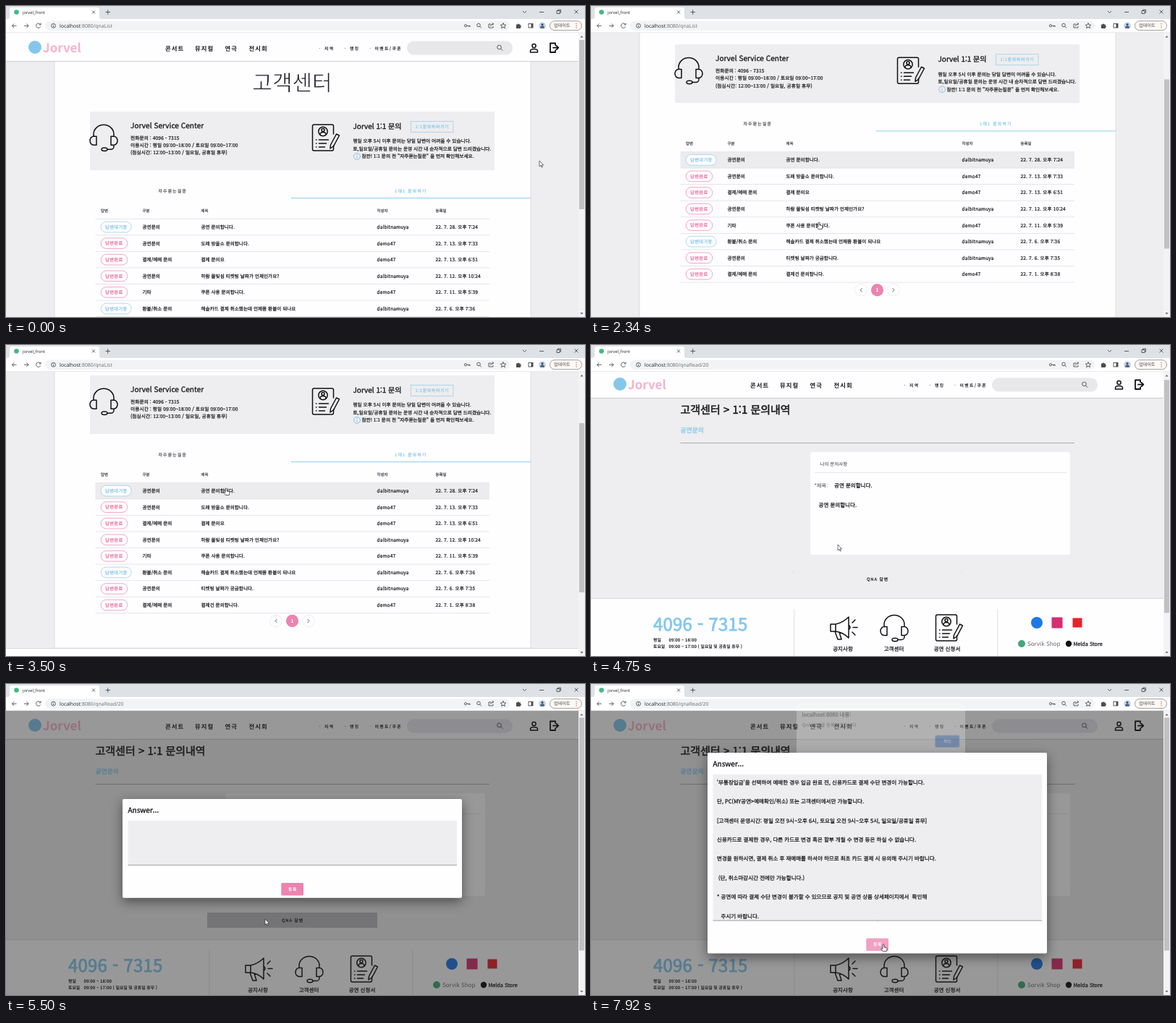
Recreate the animation shown at these times as an HTML page. Size 800 by 430 pixels, loop 8 s.

```html
<!DOCTYPE html>
<html lang="ko">
<head>
<meta charset="utf-8">
<title>jorvel_front</title>
<style>
html, body { margin: 0; width: 100%; height: 100%; overflow: hidden; background: #fff; }
svg { display: block; width: 800px; height: 430px; text-rendering: geometricPrecision; font-family: "Noto Sans CJK KR", "Noto Sans KR", "Noto Sans CJK JP", "Noto Sans CJK", sans-serif; }
.ui { font-family: "Open Sans", "Noto Sans CJK KR", "Noto Sans CJK JP", sans-serif; }
.line { fill: none; stroke: #111; stroke-width: 1.5; stroke-linecap: round; stroke-linejoin: round; }
.tool { fill: none; stroke: #4a4d51; stroke-width: .9; }
.raised { filter: drop-shadow(0 .9px .4px #0005); }
.modal { filter: drop-shadow(0 5px 8px #0007); }
</style>
</head>
<body>
<script>
const BLUE = '#84c7ea', PINK = '#ee82b1', GREY = '#eeedef', WHITE = '#fefdff', INK = '#1c1c1e';
const ROW_TOP = 294.3, ROW_H = 22.57;

// Light and medium weights are made from the regular face with a thin outline.
const outline = (weight, size, fill) =>
  weight === 300 ? `stroke="${WHITE}" stroke-width="${size * .025}"`
  : weight === 500 ? `stroke="${fill}" stroke-width="${size * .035}"` : '';

// Text placed by its vertical centre.
const text = (x, y, str, { size = 6.67, fill = INK, weight = 500, gap = 0, mid = false, cls = '' } = {}) =>
  `<text x="${x}" y="${y + size * .37}" font-size="${size}" fill="${fill}" font-weight="${weight === 700 ? 700 : 400}"
    letter-spacing="${gap}" ${outline(weight, size, fill)} ${mid ? 'text-anchor="middle"' : ''} class="${cls}">${str.replace(/>/g, '&gt;')}</text>`;
const rect = (x, y, w, h, fill, more = '') => `<rect x="${x}" y="${y}" width="${w}" height="${h}" fill="${fill}" ${more}/>`;
const circle = (x, y, r, fill, more = '') => `<circle cx="${x}" cy="${y}" r="${r}" fill="${fill}" ${more}/>`;
const path = (d, cls = 'line', more = '') => `<path d="${d}" class="${cls}" ${more}/>`;
const at = (x, y, body) => `<g transform="translate(${x} ${y})">${body}</g>`;

const headset = path('M5 17v-3a14 13 0 0 1 28 0v3M33 29v2a4 4 0 0 1-4 4h-5M9 17v12H5a5 6 0 0 1 0-12zM29 17v12h4a5 6 0 0 0 0-12z')
  + '<ellipse cx="20" cy="35" rx="4" ry="2.2" class="line"/>';
const form = path('M30 14V3a2 2 0 0 0-2-2H3a2 2 0 0 0-2 2v32a2 2 0 0 0 2 2h25a2 2 0 0 0 2-2v-5')
  + circle(15.5, 10.5, 6.2, 'none', 'class="line"') + circle(15.5, 8.5, 2, 'none', 'class="line"')
  + path('M11.5 14.5q0-3 4-3t4 3M6 22h.5M10 22h13M6 27h.5M10 27h10M6 32h.5M10 32h8M34 14l4 2-8 15-4.5 3 .5-5z');
const megaphone = path('M1 11h7v10H1zM8 11Q18 9 26 1v29Q18 22 8 21M7 21l4 11h5l-3-10M26 12q4 3 0 7M31 9l4-4M32 15.5h6M31 22l4 4');
const magnifier = (x, y, r) => circle(x, y, r, 'none', 'class="tool"') + path(`M${x + r * .7} ${y + r * .7}l${r} ${r}`, 'tool');

const siteHeader = rect(0, 37, 791, 39, WHITE) + rect(0, 76, 791, .8, '#c9c8ca')
  + circle(40, 57, 9, BLUE) + text(51, 58, 'Jorvel', { size: 17, fill: '#f6b3cb', weight: 700 })
  + [[220, '콘서트'], [261, '뮤지컬'], [302.5, '연극'], [335.5, '전시회']].map(([x, s]) =>
      text(x, 58.5, s, { size: 8.33, weight: 700, gap: 1.05 })).join('')
  + [[440, '지역'], [475, '랭킹'], [509.5, '이벤트/쿠폰']].map(([x, s]) =>
      text(x, 58.5, s, { size: 5.83, weight: 700, gap: 1.4 }) + circle(x - 6.5, 58.5, .6, '#777')).join('')
  + rect(554, 48.5, 146, 19, '#e8e7e9', 'rx="9.5"') + magnifier(681.5, 57, 2.8)
  + circle(729.5, 55, 2.6, 'none', 'class="line"') + path('M724.5 64v-1.5q0-3 5-3t5 3V64z')
  + path('M759 54v-2.5h-7v12.5h7V61.5M756 57.7h7M760.5 55l2.8 2.7-2.8 2.7', 'line', 'style="stroke-width:1.8"');

const rows = [
  [0, '공연문의', '공연 문의합니다.', 0, '22. 7. 28. 오후 7:24'],
  [1, '공연문의', '도래 방울쇼 문의합니다.', 1, '22. 7. 13. 오후 7:33'],
  [1, '결제/예매 문의', '결제 문의요', 1, '22. 7. 13. 오후 6:51'],
  [1, '공연문의', '하람 물빛섬 티켓팅 날짜가 언제인가요?', 0, '22. 7. 12. 오후 10:24'],
  [1, '기타', '쿠폰 사용 문의합니다.', 1, '22. 7. 11. 오후 5:39'],
  [0, '환불/취소 문의', '해솔카드 결제 취소했는데 언제쯤 환불이 되나요', 0, '22. 7. 6. 오후 7:36'],
  [1, '공연문의', '티켓팅 날짜가 궁금합니다.', 0, '22. 7. 6. 오후 7:35'],
  [1, '결제/예매 문의', '결제건 문의합니다.', 1, '22. 7. 1. 오후 8:38'],
];
const users = ['dalbitnamuya', 'demo47'];
const rowMarkup = ([done, kind, title, user, date], i) => {
  const y = ROW_TOP + ROW_H * (i + .5), color = done ? '#ec6b9b' : '#7fc3ea', cell = { size: 6.55, gap: .05 };
  return rect(131.2, y - 7.3, done ? 36.6 : 42, 14.6, WHITE, `rx="7.3" stroke="${color}" stroke-width=".6"`)
    + text(137, y, done ? '답변완료' : '답변대기중', { size: 6.2, fill: color, gap: .45 })
    + text(188.5, y, kind, cell) + text(269.5, y, title, cell)
    + text(512.5, y, users[user], { ...cell, gap: .12 }) + text(593.5, y, date, { ...cell, gap: .15 })
    + rect(123.5, y + ROW_H / 2 - .4, 544.5, .7, '#dcdbdd');
};
const pager = (x, d) => circle(x, 485.5, 8.3, WHITE, 'class="raised"') + path(d, 'tool');

const listPage = rect(0, 37, 791, 500, GREY) + rect(67, 76, 658, 447, WHITE, 'stroke="#d3d2d4" stroke-width=".7"')
  + rect(0, 523, 791, 20, WHITE) + rect(0, 523, 791, .7, '#c9c8ca') + siteHeader
  + text(395.5, 105.5, '고객센터', { size: 30, weight: 300, mid: true })
  + rect(116, 146, 559, 81, GREY) + at(116, 163.3, headset) + at(422.5, 163, form)
  + text(172, 165.5, 'Jorvel Service Center', { size: 10, gap: .07 })
  + text(172, 182.5, '전화문의 : 4096 - 7315', { gap: .1 })
  + text(172, 192.5, '이용시간 : 평일 09:00~18:00 / 토요일 09:00~17:00', { gap: .1 })
  + text(172, 203, '(점심시간: 12:00~13:00 / 일요일, 공휴일 휴무)', { gap: .1 })
  + text(479.5, 166, 'Jorvel 1:1 문의', { size: 10 })
  + rect(559.5, 159.5, 58.5, 15, 'none', `stroke="${BLUE}" stroke-width=".6"`)
  + text(565.5, 167, '1:1문의하러가기', { size: 5.83, fill: BLUE, gap: .7 })
  + text(479.5, 187, '평일 오후 5시 이후 문의는 당일 답변이 어려울 수 있습니다.')
  + text(479.5, 197.5, '토,일요일/공휴일 문의는 운영 시간 내 순차적으로 답변 드리겠습니다.')
  + circle(485, 208, 4.4, 'none', `stroke="${BLUE}"`) + rect(484.5, 207.5, 1, 3, BLUE) + rect(484.5, 205.5, 1, 1, BLUE)
  + text(491.5, 208, '잠깐! 1:1 문의 전 "자주묻는질문" 을 먼저 확인해보세요.')
  + text(210.5, 255.5, '자주묻는질문', { size: 5.83, fill: '#555', gap: 1.25 })
  + text(537, 255.5, '1대1 문의하기', { size: 5.83, fill: BLUE, gap: 1.2 })
  + rect(394, 265.2, 331, .9, BLUE)
  + [[131, '답변'], [188.5, '구분'], [269.5, '제목'], [512.5, '작성자'], [593.5, '등록일']]
      .map(([x, s]) => text(x, 283, s, { size: 5.4, fill: '#444' })).join('')
  + rect(123.5, ROW_TOP - .4, 544.5, .7, '#dcdbdd')
  + rect(123.5, ROW_TOP, 544.5, ROW_H, '#ecebed', 'id="hover"') + rows.map(rowMarkup).join('')
  + pager(373, 'M374.5 483l-2.5 2.5 2.5 2.5') + pager(418, 'M416.5 483l2.5 2.5-2.5 2.5')
  + circle(395.5, 485.5, 8.4, PINK, 'class="raised"') + text(395.5, 485.5, '1', { fill: '#fff', weight: 700, mid: true });

const foot = { size: 5.9, weight: 700 }, label = { size: 7.5, mid: true };
const readPage = rect(0, 37, 791, 400, GREY) + siteHeader
  + text(123.5, 92.6, '고객센터 > 1:1 문의내역', { size: 15 })
  + text(123.5, 121, '공연문의', { size: 8.8, fill: BLUE }) + rect(123.5, 138.2, 544.5, .8, '#9b9a9c')
  + rect(303, 151, 359, 142, WHITE, 'rx="1.5" class="raised"')
  + text(316.5, 168, '나의 문의사항', { size: 6.5, fill: '#333', weight: 400 }) + rect(309, 179.2, 348, .7, '#dddcde')
  + text(308.5, 197, '*제목:', { size: 7.2, fill: '#444', weight: 400 })
  + text(336, 197, '공연 문의합니다.', { size: 7.5 }) + text(314.5, 224, '공연 문의합니다.', { size: 7.5 })
  + rect(278, 316, 235, 21, GREY, 'rx="1.5" class="raised"') + rect(278, 316, 235, 21, '#000', 'rx="1.5" id="press"')
  + text(396, 326.5, 'QNA 답변', { size: 5.83, gap: .9, mid: true })
  + rect(0, 353, 791, 90, WHITE) + rect(0, 353, 791, .7, '#c9c8ca')
  + rect(280.5, 368, .7, 75, '#d3d2d4') + rect(561.5, 368, .7, 75, '#d3d2d4')
  + text(86, 389.5, '4096 - 7315', { size: 24, fill: BLUE, gap: .2 })
  + text(86, 410.5, '평일', foot) + text(107.5, 410.5, '09:00 ~ 18:00', foot)
  + text(86, 419.5, '토요일', foot) + text(107.5, 419.5, '09:00 ~ 17:00 ( 일요일 및 공휴일 휴무 )', foot)
  + at(330, 378, megaphone) + at(400, 375.5, headset) + at(475.5, 375, form)
  + text(348, 423.5, '공지사항', label) + text(418.5, 423.5, '고객센터', label) + text(492, 423.5, '공연 신청서', label)
  + circle(616, 387, 8, '#1f77e5') + rect(636.5, 379.5, 15, 15, '#d62f72') + rect(665.5, 380.5, 13, 13, '#e8222c')
  + circle(595, 416, 5, '#45a779') + text(603, 416, 'Sorvik Shop', { size: 8, fill: '#6b6a6c', weight: 400 })
  + circle(660, 416, 4.2, '#111') + text(666.5, 416, 'Melda Store', { size: 7.2 });

const answer = [
  [174, "'무통장입금'을 선택하여 예매한 경우 입금 완료 전, 신용카드로 결제 수단 변경이 가능합니다."],
  [174, '단, PC(MY공연>예매확인/취소) 또는 고객센터에서만 가능합니다.'],
  [174, '[고객센터 운영시간: 평일 오전 9시~오후 6시, 토요일 오전 9시~오후 5시, 일요일/공휴일 휴무]'],
  [174, '신용카드로 결제한 경우, 다른 카드로 변경 혹은 할부 개월 수 변경 등은 하실 수 없습니다.'],
  [174, '변경을 원하시면, 결제 취소 후 재예매를 하셔야 하므로 최초 카드 결제 시 유의해 주시기 바랍니다.'],
  [176, '(단, 취소마감시간 전에만 가능합니다.)'],
  [174, '* 공연에 따라 결제 수단 변경이 불가할 수 있으므로 공지 및 공연 상품 상세페이지에서\u00a0 확인해'],
  [179.5, '주시기 바랍니다.'],
];
const dialog = rect(161, 0, 469, 10, WHITE, 'id="card" rx="1.8" class="modal"')
  + text(168.5, 15.5, 'Answer...', { size: 10 }) + rect(168.5, 30, 454.5, 10, GREY, 'id="area" rx="1.5"')
  + `<g id="answer">${answer.map(([x, s], i) => text(x, 41 + 26.4 * i, s, { size: 7.5 })).join('')}</g>`
  + `<g id="base">${rect(168.5, -.8, 454.5, .8, '#8e8d8f')}${rect(-227.2, -1, 454.4, 1.1, PINK, 'id="focus"')}</g>`
  + `<g id="submit">${rect(380.5, 0, 30.5, 17.3, PINK, 'rx="1.5" class="raised"')}${text(396, 8.6, '등록', { size: 5.83, fill: '#fff', weight: 700, gap: .7, mid: true })}</g>`;

const alertBox = rect(284, 27, 233, 69, '#fff', 'rx="3" class="raised"')
  + text(291.5, 42.5, 'localhost:8080 내용:', { size: 7.4 }) + text(291.5, 57, 'QnA 답변을 등록하였습니다.', { size: 6.4, weight: 400 })
  + rect(475.5, 71, 33.5, 16.5, '#1a73e8', 'rx="2" stroke="#8ab8f5" stroke-width="1.2"')
  + text(492.5, 79, '확인', { size: 5.6, fill: '#fff', mid: true });

const browser = rect(0, 0, 800, 18, '#dee1e6') + path('M2 18q3 0 3-3V5q0-3 3-3h118q3 0 3 3v10q0 3 3 3z', '', 'fill="#fff"')
  + rect(0, 18, 800, 19, '#fff') + rect(0, 36.5, 800, .6, '#d8dade')
  + circle(14.5, 8.5, 3.3, '#41b883') + text(23, 8.5, 'jorvel_front', { size: 5.8, weight: 400, cls: 'ui' })
  + path('M119 6.5l4 4m0-4l-4 4M137.5 8.5h6.5M140.7 5.3v6.5M714 7l2.5 2.5L719 7M737 8.5h6M761 6.5h4v4h-4zM762.5 6.5v-1.3h4v4h-1.3M785.5 5.5l5 5m0-5l-5 5', 'tool')
  + rect(54, 20.5, 642, 13.5, '#f1f3f4', 'rx="6.7"')
  + path('M14.5 27.3h-6m2.7-2.8l-2.8 2.8 2.8 2.8M25 27.3h6m-2.7-2.8l2.8 2.8-2.8 2.8M47.5 25.5a3.2 3.2 0 1 0 .2 3M48 23.5v2.5h-2.5', 'tool')
  + circle(65.5, 27.3, 2.9, 'none', 'class="tool"') + path('M65.5 27v2M65.5 25.3v.8', 'tool')
  + '<text x="74" y="29.7" font-size="6.95" class="ui"><tspan fill="#202124">localhost</tspan><tspan fill="#6b6f74">:8080/<tspan id="route"></tspan></tspan></text>'
  + circle(635, 27.3, 1.6, 'none', 'class="tool"') + path('M636.6 27.3h4.5v1.7m-1.8-1.7v1.5', 'tool') + magnifier(653, 26.5, 2.3)
  + path('M670 25h-3v5h6v-2M669.5 28q0-3 4-3.2m-1.7-1.5l2 1.5-2 1.7M687 23.5l1.1 2.5 2.7.2-2 1.8.6 2.7-2.4-1.5-2.4 1.5.6-2.7-2-1.8 2.7-.2z', 'tool')
  + path('M705 25.5h1.8a1.1 1.1 0 1 1 2.2 0h1.8v1.8a1.1 1.1 0 1 1 0 2.2V31H705z', '', 'fill="#4a4d51"')
  + rect(722, 24.5, 6, 5.5, 'none', 'class="tool"') + rect(725.5, 24.5, 2.5, 5.5, '#4a4d51')
  + circle(741, 27.3, 5, '#c9d6ea') + circle(741, 25.7, 1.6, '#3c5478') + path('M738 30.5q0-3 3-3t3 3z', '', 'fill="#3c5478"')
  + rect(751.5, 20.7, 44, 13, '#fbf9f8', 'rx="6.5" stroke="#7d7673" stroke-width=".7"')
  + text(757, 27.2, '업데이트', { size: 6.1, fill: '#4a3f3a', weight: 400 })
  + [24.5, 27.2, 29.9].map(y => circle(788, y, .75, '#e8710a')).join('');

const scrollbar = rect(791, 37, 9, 393, '#f3f2f4') + rect(792, 47, 7, 10, '#c1c0c2', 'id="thumb"')
  + path('M793.5 43.5l2-2.5 2 2.5zM793.5 424l2 2.5 2-2.5z', '', 'fill="#666"');
const pointers = {
  arrow: path('M0 0v8l1.9-1.7 1.3 2.9 1.2-.6-1.3-2.7h2.5z', '', 'fill="#fff" stroke="#111" stroke-width=".6"'),
  hand: path('M-1 1a1 1 0 0 1 2 0v3l3 .6q1.2.3 1 1.6L4.3 9.5h-5L-3.4 6q.6-1.2 2.4.3z', '', 'fill="#fff" stroke="#111" stroke-width=".65"'),
  beam: path('M-1.5-3.5h3M0-3.5v7M-1.5 3.5h3', 'tool', 'style="stroke:#222"'),
};

document.body.innerHTML = `<svg viewBox="0 0 800 430">
  <g id="list">${listPage}</g><g id="read">${readPage}</g>
  ${rect(0, 37, 791, 393, '#212121', 'id="scrim"')}<g id="dialog">${dialog}</g>
  ${browser}${scrollbar}<g id="alert">${alertBox}</g>
  <g id="cursor">${Object.entries(pointers).map(([k, v]) => `<g id="${k}">${v}</g>`).join('')}</g></svg>`;

const $ = id => document.getElementById(id);
const set = (id, attrs) => { for (const k in attrs) $(id).setAttribute(k, attrs[k]); };
const show = (id, on) => set(id, { display: on ? 'inline' : 'none' });
const move = (id, x, y, scale = '') => set(id, { transform: `translate(${x} ${y}) ${scale}` });
const ramp = (t, a, b) => Math.min(1, Math.max(0, (t - a) / (b - a)));
const smooth = p => p * p * (3 - 2 * p);

const LOOP = 8000, NAVIGATE = 4000, OPEN = 5330, PASTE = 7050, SUBMIT = 7790;
const track = [[0, 737, 214], [300, 737, 214], [1500, 315, 299], [2550, 315, 299], [3300, 304, 198], [4050, 304, 198],
  [4750, 341, 276], [5250, 358, 325], [5650, 358, 325], [6350, 345, 248], [7150, 345, 248], [7600, 404, 360], [LOOP, 404, 360]];

function pointerAt(t) {
  const i = track.findIndex(k => k[0] > t), [t0, x0, y0] = track[i - 1], [t1, x1, y1] = track[i];
  const p = smooth(ramp(t, t0, t1));
  return [x0 + (x1 - x0) * p, y0 + (y1 - y0) * p];
}

function draw(t) {
  const onList = t < NAVIGATE, [x, y] = pointerAt(t);
  const scroll = onList ? 104 * (1 - (1 - ramp(t, 2184, 2484)) ** 3) : t < OPEN ? 3 : 0;
  show('list', onList); show('read', !onList);
  move(onList ? 'list' : 'read', 0, -scroll);
  $('route').textContent = onList ? 'qnaList' : 'qnaRead/20';
  set('thumb', onList ? { y: 47 + scroll * .587, height: 234 } : { y: 46.5 + scroll * .6, height: 322 });

  // Row hover stays put while the page is scrolling.
  const scrolling = t > 2150 && t < 2560;
  const row = scrolling ? 0 : Math.floor((y + scroll - ROW_TOP) / ROW_H);
  const overRow = onList && x > 123 && x < 668 && row >= 0 && row < rows.length;
  show('hover', overRow);
  set('hover', { y: ROW_TOP + row * ROW_H });

  const overButton = t > 5000 && y > 314;
  set('press', { opacity: t < OPEN ? (t > NAVIGATE && overButton ? .06 : 0) : .22 * (1 - ramp(t, 5510, 5760)) });
  set('scrim', { opacity: .46 * ramp(t, OPEN, 5480) });

  const pasted = t >= PASTE, height = pasted ? 277.5 : 136.7;
  show('dialog', t >= OPEN); show('answer', pasted);
  set('dialog', { opacity: ramp(t, OPEN, 5450) });
  move('dialog', 0, pasted ? 95 : 159 + 6.7 * smooth(ramp(t, 5510, 5740)));
  set('card', { height }); set('area', { height: height - 75 });
  move('base', 0, height - 45);
  move('focus', 395.8, 0, `scale(${smooth(ramp(t, 6380, 6560)) * (1 - smooth(ramp(t, SUBMIT, 7925)))} 1)`);
  move('submit', 0, height - 20.8);
  set('submit', { opacity: t > SUBMIT ? .75 : 1 });
  set('alert', { opacity: ramp(t, 7875, 8060) });

  const overArea = t > OPEN + 300 && y < 257 + (pasted ? 70 : 0);
  const kind = overRow || (pasted && y > 350) ? 'hand' : overArea ? 'beam' : 'arrow';
  for (const k in pointers) show(k, k === kind);
  move('cursor', x, y);
}

const start = performance.now();
(function frame() {
  draw((performance.now() - start) % LOOP);
  requestAnimationFrame(frame);
})();
</script>
</body>
</html>
```
